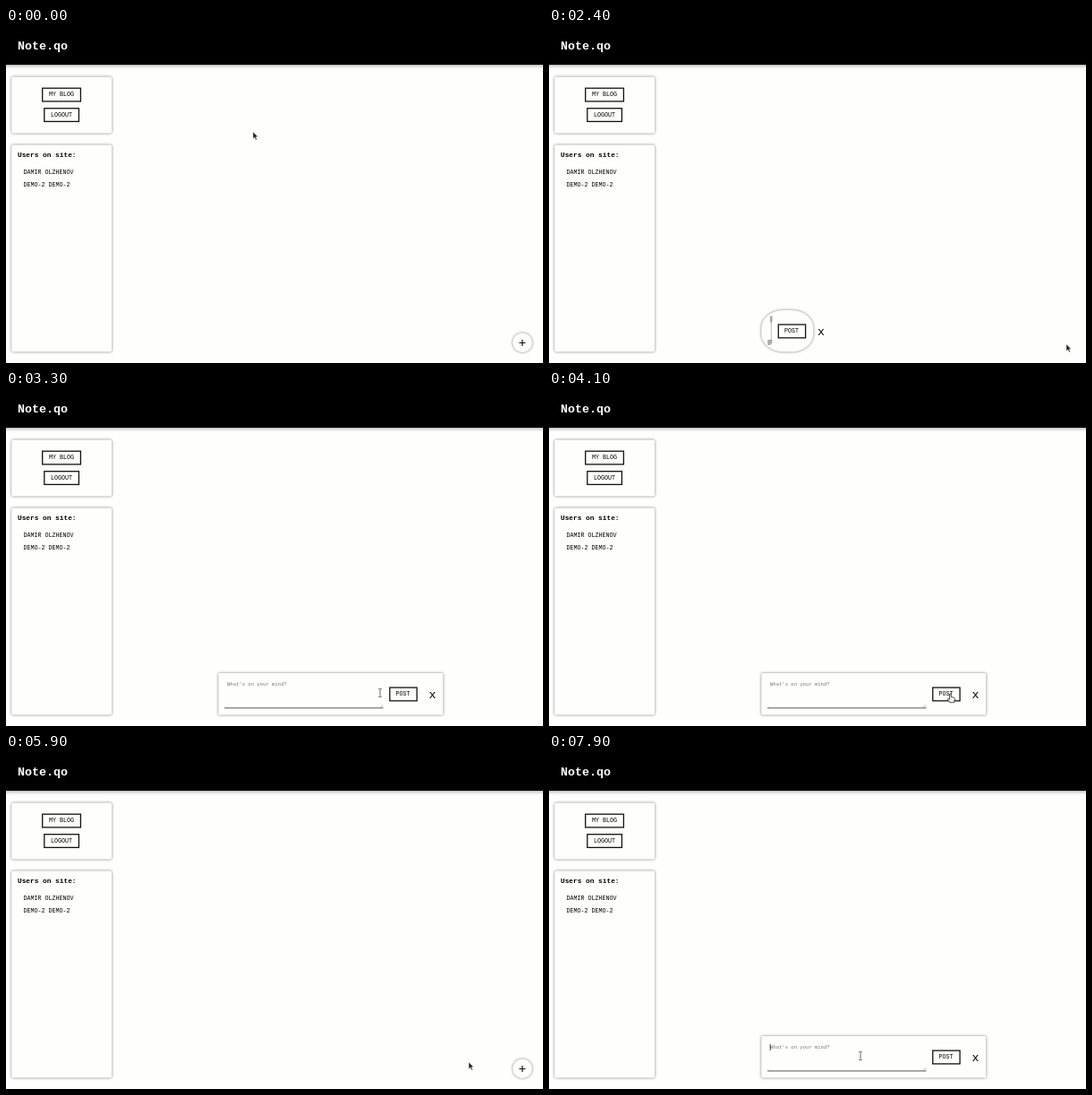
These frames come from a looping animation (600x374 px, 8 s). An HTML page:

```html
<!DOCTYPE html>
<html lang="en">
<head>
<meta charset="utf-8">
<title>Blog page</title>
<style>
  html, body { margin: 0; width: 100%; height: 100%; overflow: hidden; background: #fefefc; }
  svg { display: block; width: 600px; height: 374px; }
  text { font: 6.667px "Liberation Mono", monospace; white-space: pre; }
  .title { font-size: 13.333px; font-weight: bold; fill: #fff; }
  .heading { font-size: 7.8px; font-weight: bold; }
  .hint { font-size: 5.555px; fill: #757575; }
  .close { font-size: 13.333px; }
  .card { fill: #fefefc; filter: drop-shadow(0 0 1.7px #777); }
  .button { fill: #fefefc; stroke: #111; stroke-width: 1.3; }
  .line { fill: none; stroke: #111; stroke-width: 1.2; }
</style>
</head>
<body>
<svg viewBox="0 0 600 374">
  <rect width="600" height="374" fill="#fefefc"/>
  <rect x="-10" y="-10" width="620" height="51" style="filter:drop-shadow(0 0 2.5px #777)"/>
  <text class="title" x="13" y="24.3">Note.qo</text>

  <rect class="card" x="6.2" y="54.5" width="112" height="63" rx="2"/>
  <rect class="button" x="40.7" y="67.2" width="42.7" height="14.7"/>
  <text x="48" y="76.2">MY BLOG</text>
  <rect class="button" x="42.8" y="89.7" width="38.6" height="14.7"/>
  <text x="50" y="98.9">LOGOUT</text>

  <rect class="card" x="6.2" y="130.5" width="112" height="231" rx="2"/>
  <text class="heading" x="13" y="144">Users on site:</text>
  <text x="19.5" y="163.2">DAMIR OLZHENOV</text>
  <text x="19.5" y="177.4">DEMO-2 DEMO-2</text>

  <g id="plus">
    <circle class="card" cx="577" cy="351.2" r="10.8"/>
    <path class="line" d="M573.4 351.5h7M576.9 348v7"/>
  </g>

  <g id="form">
    <rect id="panel" class="card" x="237.3" y="315" height="46.5"/>
    <g id="field">
      <text class="hint" x="247" y="329">What's on your mind?</text>
      <path id="underline" stroke="#777" stroke-width="1.1"/>
      <path id="grip" d="M-3 352.8l2.4-2.4M-1.6 352.8l1-1" stroke="#777" stroke-width=".5"/>
      <path id="caret" d="M247.2 324v7" stroke="#111" stroke-width=".8"/>
    </g>
    <g id="squeezed" fill="#aaa">
      <path d="M247 321.5h2.5v7H247zM247.8 328h.8v20h-.8zM244.3 348h3.5v6h-3.5zM247.8 347.5h1.6v5h-1.6z"/>
    </g>
    <g id="actions">
      <rect class="button" x="7.6" y="331.1" width="30.3" height="14.8"/>
      <text x="14.4" y="340.3">POST</text>
      <text class="close" x="51.2" y="343">x</text>
    </g>
  </g>

  <g id="cursor">
    <path id="arrow" d="M0 0V7.7L1.8 6.1 3.1 9 4.4 8.4 3.1 5.6H5.5Z" fill="#222" stroke="#fff" stroke-width=".4"/>
    <path id="hand" d="M-.8.6Q0-.5.8.6V3.8L4 4.5Q5.2 4.8 5.1 6.2L4.4 8V10H-.6L-3 6.6Q-2.8 5.4-1.8 5.9L-.8 6.8Z" fill="#fff" stroke="#222" stroke-width=".8"/>
    <path id="beam" d="M-1.8-4.5H-.5L0-4 .5-4.5H1.8M0-4V4M-1.8 4.5H-.5L0 4 .5 4.5H1.8" fill="none" stroke="#444" stroke-width=".8"/>
  </g>
</svg>
<script>
const LOOP = 8000, STEP = 100;
const $ = id => document.getElementById(id);
const show = (id, on) => $(id).style.display = on ? '' : 'none';
const setAttrs = (id, attrs) => {
  for (const name in attrs) $(id).setAttribute(name, attrs[name]);
};

// Pointer moves: start time, number of steps, end x, end y
const moves = [
  [800, 3, 404, 206], [1400, 2, 547, 327], [1700, 4, 578, 353],
  [2900, 2, 455, 341], [3300, 1, 418, 337], [3400, 1, 358, 337],
  [3800, 6, 480, 338], [4800, 3, 478, 338], [5500, 5, 517, 344],
  [6100, 5, 579, 349], [7000, 3, 538, 343], [7400, 1, 370, 337],
  [7600, 2, 348, 337]
];

// Form growth: time, share of the full width
const growth = [
  [2400, .15], [2500, .75], [2600, .97], [2900, 1],
  [6900, 0], [7000, .55], [7100, .92], [7200, 1]
];

function pointerAt(t) {
  let x = 276, y = 116;
  for (const [start, steps, endX, endY] of moves) {
    if (t < start) break;
    const u = Math.min(1, ((t - start) / STEP + 1) / steps);
    const eased = u * u * (3 - 2 * u);
    x += (endX - x) * eased;
    y += (endY - y) * eased;
  }
  return { x, y };
}

function pointerKind({ x, y }, open) {
  const inside = (left, top, right, bottom) => x > left && x < right && y > top && y < bottom;
  if (!open) return Math.hypot(x - 577, y - 351) < 11 ? 'hand' : 'arrow';
  if (inside(244, 321, 422, 355)) return 'beam';
  return inside(428, 330, 461, 347) || inside(470, 331, 486, 348) ? 'hand' : 'arrow';
}

function drawForm(t) {
  const p = growth.filter(([start]) => start <= t).pop()[1];
  const width = 24 + 227 * p;
  const fieldWidth = Math.max(5, width - 73.5);
  const right = 244 + fieldWidth;
  const narrow = fieldWidth < 20;
  setAttrs('panel', {
    width,
    rx: Math.max(1, width / 2 * (1 - p)),
    ry: Math.max(1, 23.25 * (1 - p))
  });
  setAttrs('underline', { d: `M244 353.9H${right}` });
  setAttrs('grip', { transform: `translate(${right})` });
  setAttrs('actions', { transform: `translate(${right - .3})` });
  show('field', !narrow);
  show('squeezed', narrow);
  show('caret', t >= 7900);
}

function draw() {
  const t = Math.floor(performance.now() % LOOP / STEP) * STEP;
  const open = t >= 2400 && t < 5500 || t >= 6900;
  show('plus', !open);
  show('form', open);
  if (open) drawForm(t);

  const pointer = pointerAt(t);
  const kind = pointerKind(pointer, open);
  for (const id of ['arrow', 'hand', 'beam']) show(id, id === kind);
  setAttrs('cursor', { transform: `translate(${pointer.x} ${pointer.y})` });
  requestAnimationFrame(draw);
}
draw();
</script>
</body>
</html>
```
